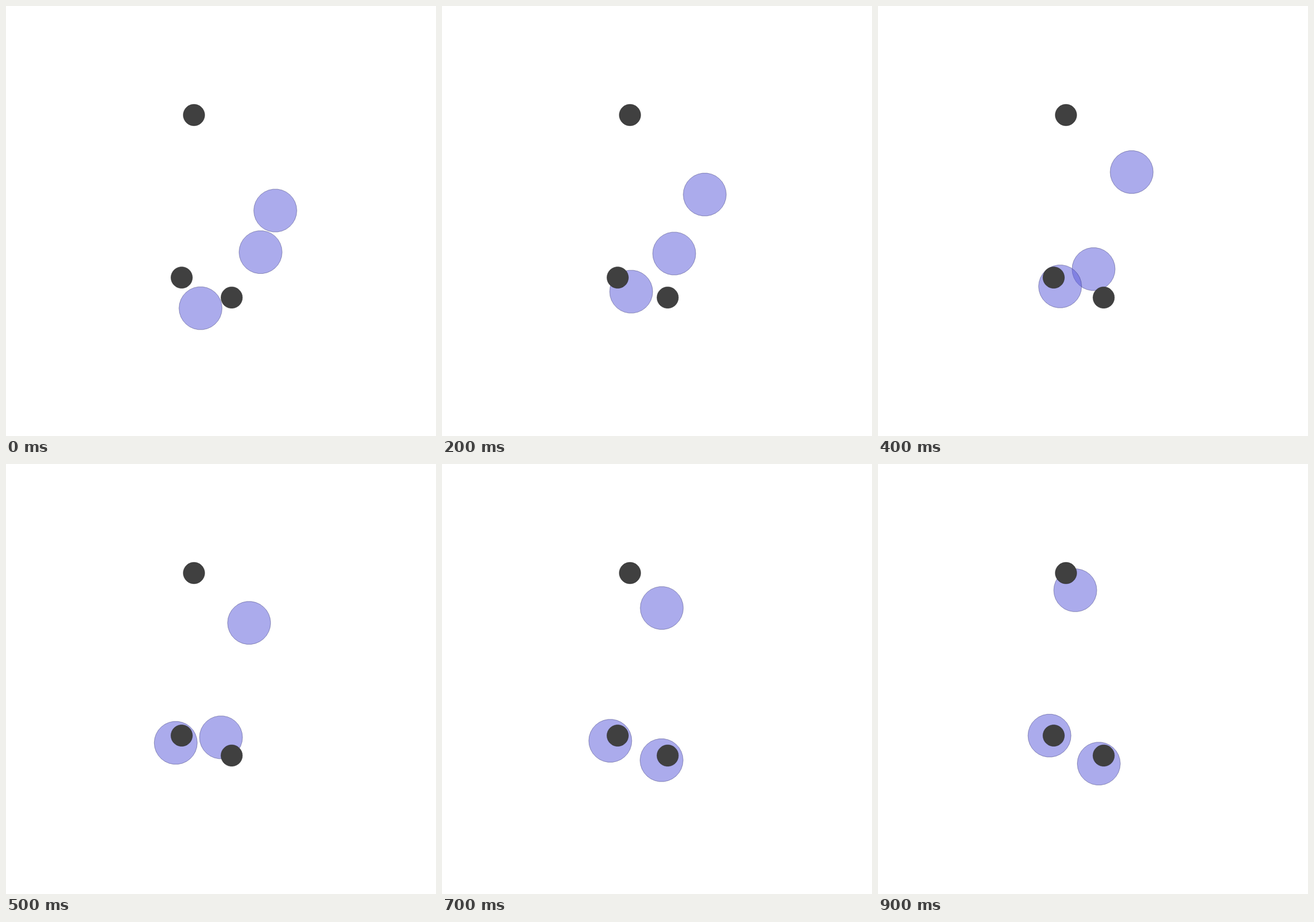
An HTML page with a canvas for the animation above (1 s loop, 700 by 700 pixels).

```html
<!DOCTYPE html>
<html>
<head>
<meta charset="utf-8">
<style>
html, body { margin: 0; height: 100%; overflow: hidden; background: #fff; }
canvas { display: block; }
</style>
</head>
<body>
<canvas id="stage" width="700" height="700"></canvas>
<script>
const ctx = document.getElementById('stage').getContext('2d');
const STEP = 100, STEPS = 10, SIDES = 30;
const RADIUS = 35, DAMPING = 0.75, PUSH = 8.75;
const PUSHES = { L: [-PUSH, 0], R: [PUSH, 0], U: [0, -PUSH], D: [0, PUSH] };

const landmarks = [[306, 177.5], [286, 442.1], [367.4, 474.7]];

// Start, first displacement, and the direction pushed on each later step
const agents = [
  { x: 438.4, y: 333, vx: -6.1, vy: -9.9, moves: 'UULLLULU' },
  { x: 414.4, y: 400.7, vx: -15.8, vy: 1.3, moves: 'LDDDDRUL' },
  { x: 316.7, y: 492, vx: 0, vy: -15.4, moves: 'LDULRRUD' }
];

// Overlapping agents repel each other by the depth of the overlap.
function repel(a, b) {
  const dx = a.x - b.x, dy = a.y - b.y, dist = Math.hypot(dx, dy);
  const k = Math.max(0, 2 * RADIUS - dist) / dist;
  a.vx += dx * k; a.vy += dy * k;
  b.vx -= dx * k; b.vy -= dy * k;
}

function advance(step) {
  for (const a of agents) {
    a.x += a.vx;
    a.y += a.vy;
    const [px, py] = PUSHES[a.moves[step]] || [0, 0];
    a.vx = a.vx * DAMPING + px;
    a.vy = a.vy * DAMPING + py;
  }
  agents.forEach((a, i) => agents.slice(i + 1).forEach(b => repel(a, b)));
}

const poses = [];
for (let step = 0; step < STEPS; step++) {
  poses.push(agents.map(a => [a.x, a.y]));
  advance(step);
}

function disc([x, y], r, fill, edge) {
  ctx.beginPath();
  for (let i = 0; i < SIDES; i++) {
    const a = 2 * Math.PI * i / SIDES;
    ctx.lineTo(x + r * Math.cos(a), y + r * Math.sin(a));
  }
  ctx.closePath();
  ctx.fillStyle = fill;
  ctx.fill();
  ctx.strokeStyle = edge;
  ctx.stroke();
}

function draw(now) {
  const step = Math.floor(now / STEP) % STEPS;
  ctx.clearRect(0, 0, 700, 700);
  for (const p of poses[step])
    disc(p, RADIUS, 'rgba(89,89,217,.5)', 'rgba(45,45,108,.42)');
  for (const p of landmarks)
    disc(p, RADIUS / 2, '#404040', 'rgba(32,32,32,.5)');
}

const start = performance.now();
function loop() {
  draw(performance.now() - start);
  requestAnimationFrame(loop);
}
loop();
</script>
</body>
</html>
```
